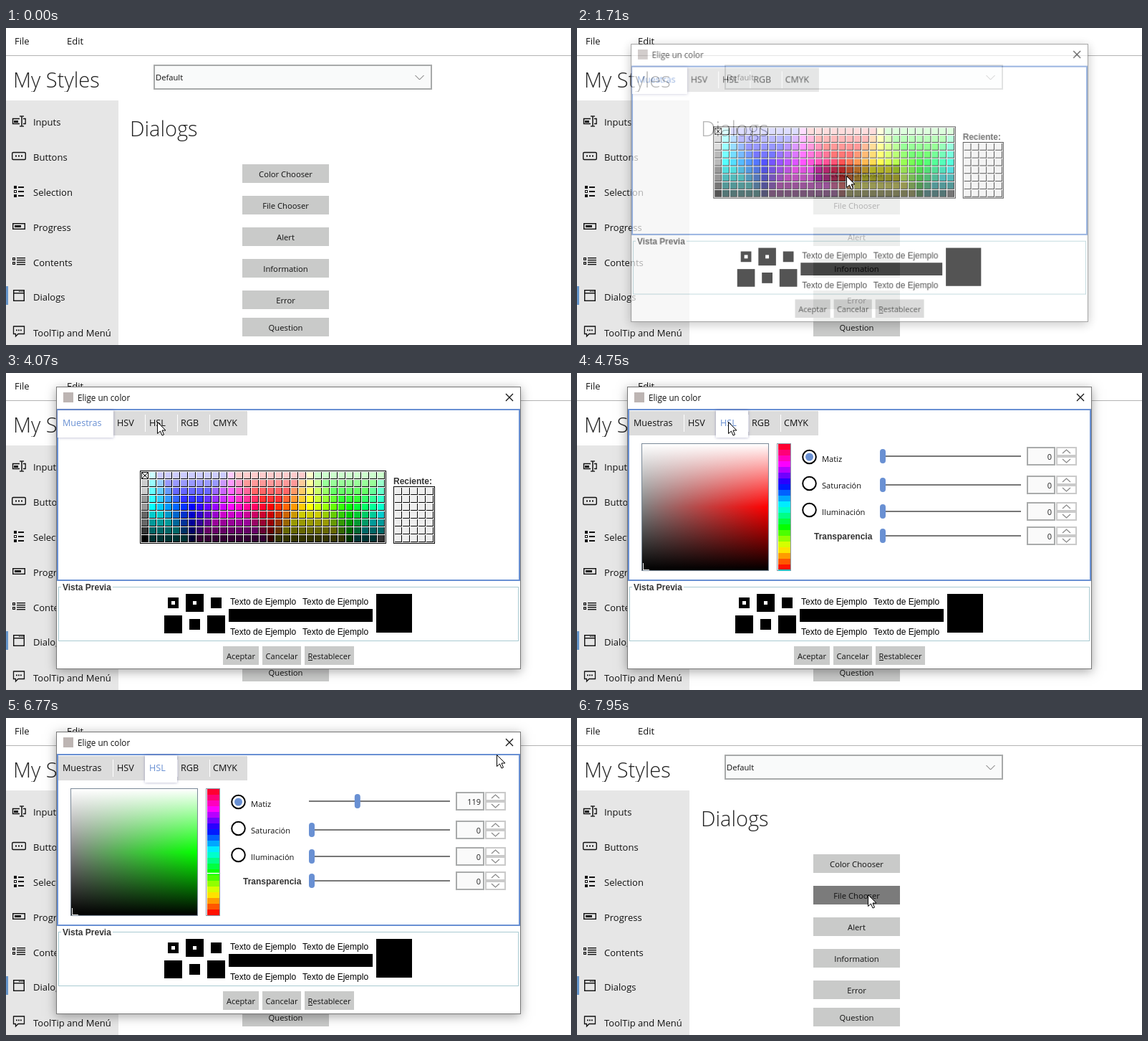
Animation of 789x442 px, one loop 8 s. Source, as an HTML page with a canvas:

```html
<!DOCTYPE html>
<html lang="es">
<head>
<meta charset="utf-8">
<title>My Styles</title>
<style>
html, body { margin: 0; width: 100%; height: 100%; overflow: hidden; background: #fff; }
canvas { display: block; }
</style>
</head>
<body>
<canvas id="stage" width="789" height="442"></canvas>
<script>
const W = 789, H = 442, LOOP = 8000, STEP = 76;
const stage = document.getElementById('stage').getContext('2d');
const layer = document.createElement('canvas');
layer.width = W;
layer.height = H;
const dialogCtx = layer.getContext('2d');
let g = stage;

const BLUE = '#6990d3', BUTTON = '#c9cac9', HOVER = '#7b7b7b', INK = '#111';
const UI = '"Open Sans", "Noto Sans", sans-serif';
const SANS = '"Liberation Sans", Arial, sans-serif';

// The screen refreshes in steps, restarting at these times.
const BEATS = [0, 680, 1510, 1710, 2270, 2760, 3370, 4070, 4200, 5090, 5790, 5870, 5940, 6770, 7610];

// Pointer path: time, x, y
const PATH = [
  [680, 495, 411], [1440, 376, 206], [2270, 376, 206], [2760, 688, 47], [3040, 704, 33],
  [3370, 704, 33], [3860, 175, 68], [4070, 211, 68], [5090, 211, 68], [5700, 429, 109],
  [5800, 429, 109], [6280, 492, 112], [6340, 492, 112], [6770, 685, 51], [6900, 703, 34],
  [7130, 703, 34], [7540, 409, 233], [7610, 408, 240], [7760, 406, 246]
];

const clamp = (v, a, b) => Math.min(b, Math.max(a, v));
const ramp = (t, a, b) => clamp((t - a) / (b - a), 0, 1);
const ease = p => p * p * (3 - 2 * p);

function hold(t) {
  const start = BEATS.filter(b => b <= t).pop();
  return start + Math.floor((t - start) / STEP) * STEP;
}

function pointerAt(t) {
  let i = 0;
  while (i < PATH.length - 1 && PATH[i + 1][0] <= t) i++;
  const a = PATH[i], b = PATH[i + 1] || a;
  const p = b === a ? 0 : ease(ramp(t, a[0], b[0]));
  return [a[1] + (b[1] - a[1]) * p, a[2] + (b[2] - a[2]) * p];
}

function box(x, y, w, h, fill) {
  g.fillStyle = fill;
  g.fillRect(x, y, w, h);
}

function frame(x, y, w, h, color, line = 1) {
  g.strokeStyle = color;
  g.lineWidth = line;
  g.strokeRect(x + line / 2, y + line / 2, w - line, h - line);
}

function poly(points, color, line = 1) {
  g.strokeStyle = color;
  g.lineWidth = line;
  g.beginPath();
  points.forEach(([x, y]) => g.lineTo(x, y));
  g.stroke();
}

function round(x, y, w, h, r) {
  g.beginPath();
  g.roundRect(x, y, w, h, r);
}

function text(s, x, y, font, color = INK, align = 'left') {
  g.font = font;
  g.textAlign = align;
  g.fillStyle = color;
  g.fillText(s, x, y);
}

const ICONS = [
  y => {
    poly([[19, y - 4.5], [9.5, y - 4.5], [9.5, y + 2.5], [19, y + 2.5]], INK, 1.4);
    box(11, y - 2, 6, 3, INK);
    poly([[19, y - 8], [25, y - 8]], INK, 1.3);
    poly([[22, y - 8], [22, y + 6]], INK, 1.5);
    poly([[19, y + 6], [25, y + 6]], INK, 1.3);
    poly([[24, y - 4.5], [27.2, y - 4.5], [27.2, y + 2.5], [24, y + 2.5]], INK, 1.3);
  },
  y => {
    g.strokeStyle = INK;
    g.lineWidth = 1.4;
    round(8.7, y - 6.5, 18.6, 10, 1.5);
    g.stroke();
    for (const x of [13, 17, 21]) box(x, y - 2.5, 2, 2, INK);
  },
  y => {
    for (const d of [-9, -3, 3]) {
      box(11, y + d, 4, 4, INK);
      box(17, y + d + 1, 8, 2, INK);
    }
    box(12, y - 2, 2, 2, '#e6e6e6');
  },
  y => {
    frame(9, y - 6, 18, 9, INK, 1.4);
    box(12, y - 3, 9, 3, INK);
  },
  y => {
    for (const d of [-7, -1]) {
      frame(9, y + d, 4, 4, INK, 1.2);
      box(15, y + d, 12, 1.4, INK);
      box(15, y + d + 3, 12, 1.4, INK);
    }
  },
  y => {
    frame(10, y - 10, 16, 16, INK, 1.4);
    box(10, y - 6, 16, 1.4, INK);
    for (const x of [18, 20.5, 23]) box(x, y - 8.3, 1.3, 1.3, INK);
  },
  y => {
    poly([[10.5, y - 9], [25.5, y - 9], [25.5, y + 1.5], [17, y + 1.5], [13.5, y + 5],
      [13.5, y + 1.5], [10.5, y + 1.5], [10.5, y - 9.6]], INK, 1.3);
    for (const x of [14, 17, 20]) box(x, y - 4.5, 1.8, 1.8, INK);
  }
];

const MENU = [['Inputs', 131], ['Buttons', 180], ['Selection', 229], ['Progress', 278],
  ['Contents', 327], ['Dialogs', 375], ['ToolTip and Menú', 425]];
const ACTIONS = [['Color Chooser', 190], ['File Chooser', 234], ['Alert', 278],
  ['Information', 322], ['Error', 366], ['Question', 404]];

function drawPage(mouse) {
  box(0, 0, W, H, '#fff');
  text('File', 12, 23, `13px ${UI}`);
  text('Edit', 85, 23, `13px ${UI}`);
  box(0, 38, W, 1, '#b3b3b3');

  g.save();
  g.beginPath();
  g.rect(0, 40, 200, 49);
  g.clip();
  text('My Styles', 10, 83, `300 29px ${UI}`, '#222');
  g.restore();

  box(206, 51, 389, 35, '#f9fafa');
  frame(206, 51, 389, 35, '#a8aaaa', 2);
  text('Default', 209, 73, `11.2px ${UI}`);
  poly([[571.5, 66], [577.5, 72], [583.5, 66]], '#666');

  box(0, 101, 157, 341, '#e6e6e6');
  box(0, 360, 3, 26, '#6595cb');
  MENU.forEach(([label, y], i) => {
    ICONS[i](y);
    text(label, 38, y + 5, `13px ${UI}`);
  });

  text('Dialogs', 173, 151, `300 29px ${UI}`, '#222');
  for (const [label, y] of ACTIONS) {
    const over = mouse && mouse[0] >= 330 && mouse[0] < 451 && mouse[1] >= y && mouse[1] < y + 26;
    box(330, y, 121, 26, over ? HOVER : BUTTON);
    text(label, 390.5, y + 18, `11.25px ${UI}`, INK, 'center');
  }
}

const wheel = c => [6, 16, 26].map((peak, i) => {
  // Red, green and blue peak at columns 16, 26 and 6 of a 30-column ring.
  const top = [16, 26, 6][i];
  const d = Math.abs(((c - top) % 30 + 45) % 30 - 15);
  return clamp(10 - d, 0, 5) * 51;
});

function swatch(col, row) {
  if (!col) return Array(3).fill([255, 204, 204, 153, 153, 102, 102, 51, 0][row]);
  if (col === 30 && row === 8) return [51, 51, 51];
  const low = Math.max(0, 4 - row) * 51, high = 255 - Math.max(0, row - 4) * 51;
  return wheel(col).map(v => clamp(v, low, high));
}

function cell(x, y, color) {
  box(x, y, 10, 10, '#000');
  box(x, y, 9, 9, color);
}

function drawSamples() {
  box(187, 136, 344, 102, '#fff');
  frame(187, 136, 344, 102, '#000');
  for (let r = 0; r < 9; r++)
    for (let c = 0; c < 31; c++) cell(189 + c * 11, 138 + r * 11, `rgb(${swatch(c, r)})`);
  frame(189, 138, 10, 10, '#000');
  poly([[189, 138], [199, 148]], '#000');
  poly([[199, 138], [189, 148]], '#000');

  text('Reciente:', 541, 155, `bold 12px ${SANS}`, '#333');
  frame(541, 158, 58, 80, '#000');
  for (let r = 0; r < 7; r++)
    for (let c = 0; c < 5; c++) cell(543 + c * 11, 160 + r * 11, '#eee');
}

function drawSlider(y, value, pressed) {
  box(423, y - 1, 197, 2, '#777');
  g.fillStyle = pressed ? '#000' : BLUE;
  round(423 + value / 360 * 193, y - 10, 8, 20, 4);
  g.fill();

  box(628, y - 13, 40, 26, '#fafafa');
  frame(628, y - 13, 40, 26, '#a9abab', 2);
  text(value, 663, y + 5, `11px ${UI}`, '#222', 'right');
  for (const d of [-13, 0]) {
    const s = d ? 1 : -1, m = y + d + 6.5;
    frame(669, y + d, 29, 13, '#cacaca', 2);
    poly([[678, m + 2.5 * s], [683.5, m - 2.5 * s], [689, m + 2.5 * s]], '#888', 1.2);
  }
}

function drawHsl(hue, pressed) {
  frame(90, 98, 178, 178, '#7b8a99');
  const sat = g.createLinearGradient(92, 0, 267, 0);
  sat.addColorStop(0, '#808080');
  sat.addColorStop(1, `hsl(${hue},100%,50%)`);
  box(91, 99, 176, 176, sat);
  const light = g.createLinearGradient(0, 99, 0, 275);
  light.addColorStop(0, '#fff');
  light.addColorStop(.5, 'rgba(255,255,255,0)');
  light.addColorStop(.5, 'rgba(0,0,0,0)');
  light.addColorStop(1, '#000');
  box(91, 99, 176, 176, light);
  box(92, 265, 1, 9, '#fff');
  box(92, 274, 9, 1, '#fff');

  frame(279, 98, 20, 178, '#8b98a6');
  for (let i = 0; i < 44; i++)
    box(281, 271 - i * 4, 17, 4, `hsl(${Math.floor(i / 2) * 16.4 + 4},100%,50%)`);
  box(281, 274 - hue / 360 * 176, 17, 1.5, hue < 1 ? '#0cc' : '#fff');

  ['Matiz', 'Saturación', 'Iluminación'].forEach((label, i) => {
    const y = 117 + i * 37;
    g.strokeStyle = '#000';
    g.lineWidth = 2;
    g.beginPath();
    g.arc(324.5, y, 9.3, 0, 7);
    g.stroke();
    if (!i) {
      g.fillStyle = BLUE;
      g.beginPath();
      g.arc(324.5, y, 5.5, 0, 7);
      g.fill();
    }
    text(label, 342, y + 7, `11.1px ${UI}`);
  });
  text('Transparencia', 331, 232, `bold 12px ${SANS}`, '#333');
  drawSlider(116, hue, pressed);
  for (const y of [156, 193, 227]) drawSlider(y, 0, false);
}

const TABS = [['Muestras', 72, 78, 79], ['HSV', 150, 44, 155], ['HSL', 194, 45, 200],
  ['RGB', 239, 45, 244], ['CMYK', 284, 53, 289]];

function drawTabs(active) {
  box(73, 53, 264, 34, '#dcdcdc');
  for (const x of [149, 194, 239, 284]) box(x, 58, 1, 24, '#fff');
  const [, x, w] = TABS[active];
  g.save();
  g.shadowColor = 'rgba(70,70,130,.45)';
  g.shadowBlur = 4;
  box(x, 52, w, 38, '#fff');
  g.restore();
  TABS.forEach(([label, , , tx], i) =>
    text(label, tx, 74, `12.6px ${UI}`, i === active ? BLUE : INK));
}

function drawPreview() {
  frame(73, 298, 643, 76, '#a9cbd2');
  box(77, 296, 72, 5, '#fff');
  text('Vista Previa', 79, 303, `bold 12px ${SANS}`, '#333');
  for (const [x, y, s] of [[226, 313, 15], [251, 308, 25], [286, 313, 15],
    [221, 338, 25], [256, 343, 15], [281, 338, 25]]) box(x, y, s, s, '#000');
  box(231, 318, 5, 5, '#fff');
  box(261, 318, 5, 5, '#fff');
  box(311, 329, 201, 18, '#000');
  box(517, 308, 50, 54, '#000');
  for (const x of [313, 414])
    for (const y of [323, 365]) text('Texto de Ejemplo', x, y, `12px ${SANS}`, '#000');
}

function drawDialog(t, mouse) {
  g.clearRect(0, 0, W, H);
  g.save();
  g.shadowColor = 'rgba(0,0,0,.35)';
  g.shadowBlur = 14;
  g.shadowOffsetY = 3;
  box(70, 19, 649, 394, '#777');
  g.restore();
  box(71, 20, 647, 392, '#fff');

  box(80, 27, 14, 14, '#bdb5b3');
  text('Elige un color', 100, 39, `11.7px ${UI}`);
  const over = mouse && mouse[0] > 689 && mouse[0] < 718 && mouse[1] < 49 && mouse[1] > 20;
  if (over) box(688, 20, 30, 29, '#e81123');
  const mark = over ? '#fff' : INK;
  poly([[698, 29], [708, 39]], mark, 1.2);
  poly([[708, 29], [698, 39]], mark, 1.2);

  frame(71, 50, 647, 240, BLUE, 2);
  const hsl = t >= 4200;
  drawTabs(hsl ? 2 : 0);
  if (hsl) drawHsl(Math.round(119 * ease(ramp(t, 5800, 6280))), t >= 5700 && t < 6320);
  else drawSamples();
  drawPreview();

  for (const [label, x, w] of [['Aceptar', 303, 50], ['Cancelar', 358, 54], ['Restablecer', 417, 69]]) {
    box(x, 381, w, 26, BUTTON);
    text(label, x + w / 2, 399, `11.05px ${UI}`, INK, 'center');
  }
  box(422, 400, 6, 1, INK);
}

function drawPointer([x, y]) {
  g.beginPath();
  for (const [dx, dy] of [[0, 0], [0, 16], [4, 12.5], [6.5, 18.5], [9, 17.5], [6.5, 11.5], [11.5, 11.5]])
    g.lineTo(x + .5 + dx, y + .5 + dy);
  g.closePath();
  g.fillStyle = '#fff';
  g.fill();
  g.strokeStyle = '#000';
  g.lineWidth = 1;
  g.stroke();
}

function draw(now) {
  const t = hold(now % LOOP);
  const mouse = t >= 680 ? pointerAt(t) : null;
  g = stage;
  drawPage(mouse);

  const open = ramp(t, 1540, 1793), close = ramp(t, 7080, 7260);
  const alpha = open * (1 - close);
  if (alpha > 0) {
    g = dialogCtx;
    drawDialog(t, mouse);
    g = stage;
    const scale = 1 - .1 * (1 - open) ** 1.66 - .08 * close;
    g.save();
    g.globalAlpha = alpha;
    g.translate(394.5, 216);
    g.scale(scale, scale);
    g.drawImage(layer, -394.5, -216);
    g.restore();
  }
  if (mouse) drawPointer(mouse);
}

function tick() {
  draw(performance.now());
  requestAnimationFrame(tick);
}
tick();
</script>
</body>
</html>
```
